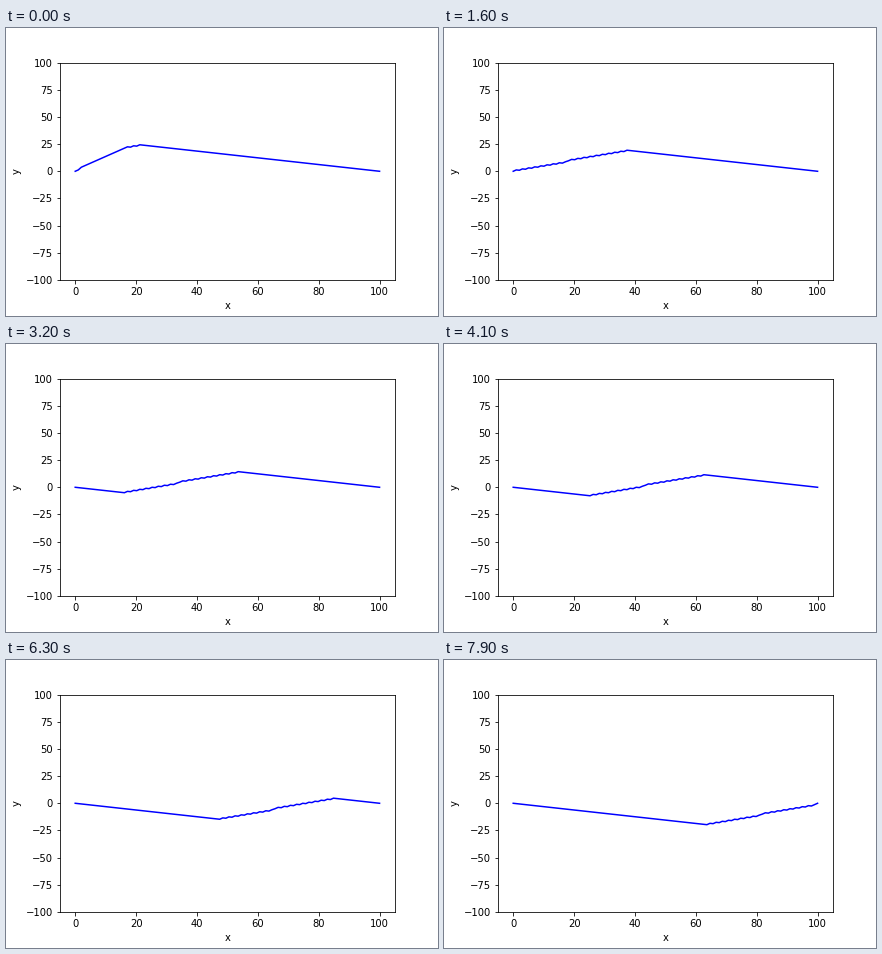
A matplotlib script that plays this animation: 432x288 px, repeating every 8000 ms.

```python
import numpy as np
import matplotlib.pyplot as plt
from matplotlib.animation import FuncAnimation

N = 100          # points on the string
PLUCK = 20       # points up to and including the peak
HEIGHT = 25.0
START = 3        # time step shown first
FRAMES = 80


def plucked():
    i = np.arange(N)
    return np.where(i < PLUCK,
                    HEIGHT * (i + 1) / PLUCK,
                    HEIGHT * (N - 1 - i) / (N - PLUCK))


def simulate(steps):
    """Leapfrog wave equation at Courant number 1 with fixed ends."""
    u = np.zeros((steps, N))
    u[0] = u[1] = plucked()
    for n in range(2, steps):
        u[n, 1:-1] = u[n - 1, 2:] + u[n - 1, :-2] - u[n - 2, 1:-1]
    return u


x = np.linspace(0, 100, N)
wave = simulate(START + FRAMES)

fig, ax = plt.subplots(figsize=(6, 4), dpi=72)
fig.subplots_adjust(left=0.125, right=0.9, bottom=0.125, top=0.88)
line, = ax.plot(x, wave[START], color="blue", lw=1.5)
ax.set(xlim=(-5, 105), ylim=(-100, 100), xlabel="x", ylabel="y")


def update(k):
    line.set_ydata(wave[START + k])
    return line,


anim = FuncAnimation(fig, update, frames=FRAMES, interval=100, repeat=True)
plt.show()
```
